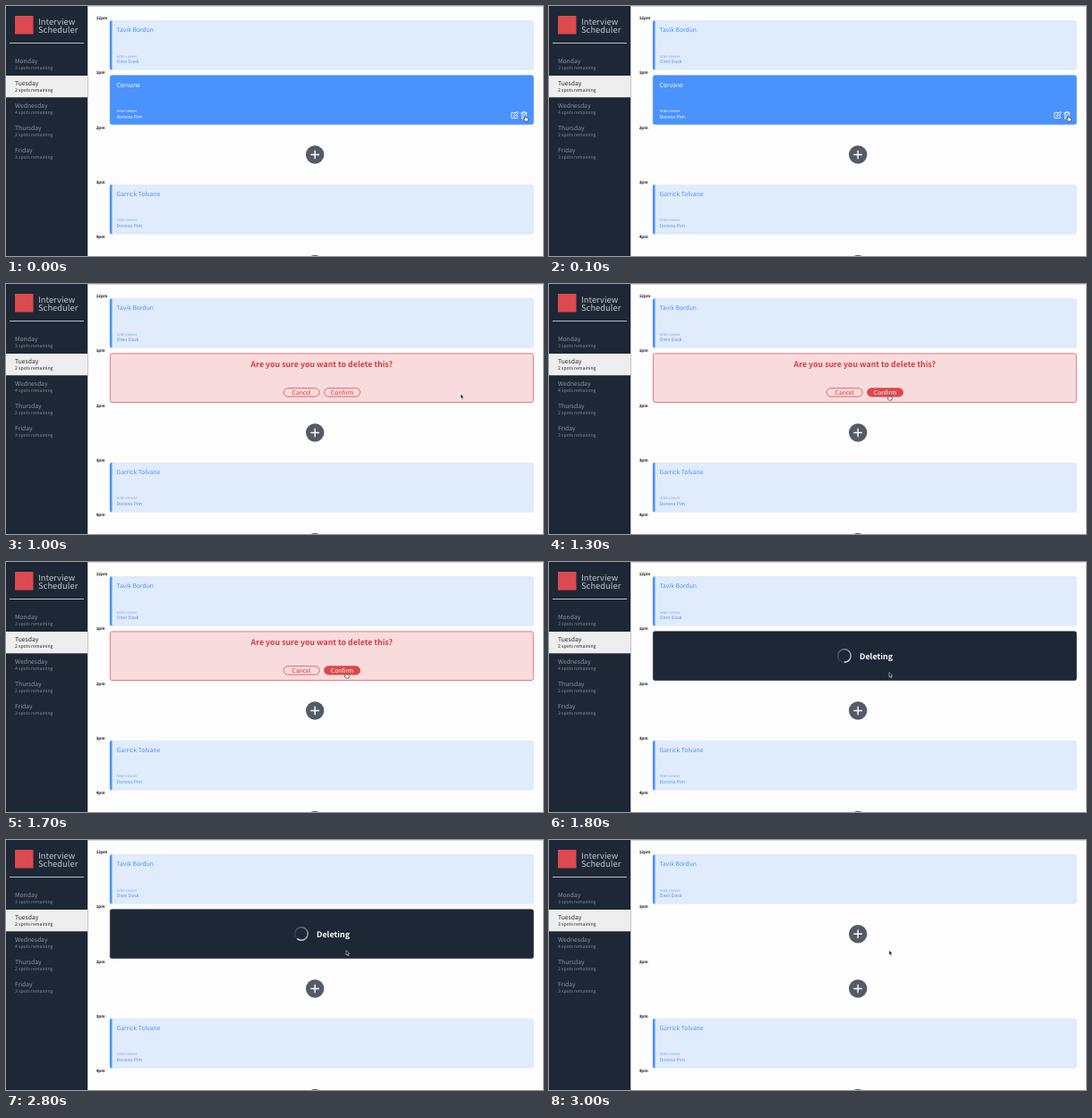
An HTML page that plays this animation: 600 px wide and 280 px high, repeating every 3100 ms.

```html
<!DOCTYPE html>
<html lang="en">
<head>
<meta charset="utf-8">
<title>Interview Scheduler</title>
<style>
  html, body { margin: 0; width: 100%; height: 100%; overflow: hidden; background: #fdfdfd; }
  svg { display: block; width: 600px; height: 280px; }
  text {
    font-family: "Noto Sans CJK JP", "Noto Sans CJK SC", "Noto Sans", sans-serif;
    font-size: 6.78px; font-weight: 500; text-rendering: geometricPrecision;
  }
  .logo { font-size: 9.3px; font-weight: 300; letter-spacing: .05px; fill: #c3c8ce; }
  .day { fill: #8d949d; }
  .spots { font-size: 5.15px; font-weight: 400; fill: #848b95; }
  .selected { fill: #23272d; }
  .time { font-size: 4.52px; font-weight: 700; fill: #161616; }
  .label { font-size: 4.34px; fill: #78acfb; }
  .name { font-size: 5.24px; }
  .blue { fill: #4a94fc; }
  .white { fill: #fff; }
  .big { font-size: 8.98px; font-weight: 700; }
  .ask { font-size: 8.8px; font-weight: 700; }
  .red { fill: #d9393e; }
  .mid { text-anchor: middle; }
  .icon { fill: none; stroke: #fff; stroke-width: .8; stroke-linejoin: round; stroke-linecap: round; }
</style>
</head>
<body>
<svg id="stage" viewBox="0 0 600 280"></svg>
<script>
const LOOP = 3100, STEP = 100, ROW = 61.3;
const DELETE_ASKED = 500, HOVER = 1200, DELETING = 1800, EMPTY = 2900;
const stage = document.getElementById('stage');

function add(parent, tag, attrs = {}, text) {
  const el = document.createElementNS('http://www.w3.org/2000/svg', tag);
  for (const key in attrs) el.setAttribute(key, attrs[key]);
  if (text) el.textContent = text;
  return parent.appendChild(el);
}
const group = (parent = stage) => add(parent, 'g');
const rect = (parent, x, y, width, height, fill, more) =>
  add(parent, 'rect', { x, y, width, height, fill, ...more });
const label = (parent, x, y, cls, text) => add(parent, 'text', { x, y, class: cls }, text);
const show = (el, on) => el.setAttribute('visibility', on ? 'visible' : 'hidden');

function panel(parent, row, fill, stroke, width = .6) {
  const inset = width / 2;
  return rect(parent, 116 + inset, 16.2 + row * ROW + inset, 473.6 - width, 55.4 - width, fill,
    { rx: 2, stroke, 'stroke-width': width });
}

function details(parent, row, title, interviewer, cls, labelCls) {
  const y = row * ROW;
  label(parent, 123.5, 29.4 + y, cls, title);
  label(parent, 123.5, 57.5 + y, labelCls, 'Interviewer');
  label(parent, 123.5, 64.2 + y, 'name ' + cls, interviewer);
}

function booking(row, title, interviewer) {
  const g = group(), top = 16.2 + row * ROW;
  panel(g, row, '#e0ebfc', '#d3e3fb');
  add(g, 'path', { d: `M118.5 ${top}h-.6a2 2 0 0 0-2 2v51.4a2 2 0 0 0 2 2h.6z`, fill: '#4a94fc' });
  details(g, row, title, interviewer, 'blue', 'label');
}

function plus(parent, row) {
  const y = 43.9 + row * ROW;
  add(parent, 'circle', { cx: 345.2, cy: y, r: 10.2, fill: '#545b66' });
  add(parent, 'path', { d: `M340.4 ${y}h9.6m-4.8-4.8v9.6`, stroke: '#fff', 'stroke-width': 1.4 });
}

function button(parent, x, text) {
  const box = rect(parent, x, 116.7, 40, 9.4, 'none',
    { rx: 4.7, stroke: '#dc474b', 'stroke-width': .8 });
  return [box, label(parent, x + 20, 123.9, 'mid red', text)];
}

// Sidebar
rect(stage, 0, 0, 600, 280, '#fdfdfd');
rect(stage, 91, 0, 509, .7, '#c9cacc');
rect(stage, 91, 0, 1, 280, '#c6c8cb');
rect(stage, 0, 0, 91, 280, '#1d2735');
rect(stage, 10, 11, 20.5, 20.5, '#dc4a4f');
label(stage, 36, 20.6, 'logo', 'Interview');
label(stage, 36, 30, 'logo', 'Scheduler');
rect(stage, 4, 41, 83, .8, '#e4e6e8');
rect(stage, 0, 78, 91, 24.3, '#eeeeee');

const spots = [3, 2, 4, 2, 3];
const spotLabels = ['Monday', 'Tuesday', 'Wednesday', 'Thursday', 'Friday'].map((day, i) => {
  const y = 63.7 + i * 25.1, picked = i === 1 ? ' selected' : '';
  label(stage, 10, y, 'day' + picked, day);
  return label(stage, 10, y + 7.2, 'spots' + picked, spots[i] + ' spots remaining');
});

// Schedule
['12pm', '1pm', '2pm', '3pm', '4pm'].forEach((hour, i) =>
  label(stage, 100.7, 15.1 + i * ROW, 'time', hour));
booking(0, 'Tavik Bordun', 'Oren Dask');
booking(3, 'Garrick Tolvane', 'Dorena Pim');
plus(stage, 2);
plus(stage, 4);

const booked = group();
panel(booked, 1, '#4a92fd', '#3f87f2');
details(booked, 1, 'Corvane', 'Dorena Pim', 'white', 'label white');
add(booked, 'path', { class: 'icon',
  d: 'M569.4 119.4h-4.6v6.2h6.4v-3.3M567.3 123.3l.3-1.6 3.9-3.4 1.2 1.3-3.8 3.4z' });
add(booked, 'path', { class: 'icon',
  d: 'M575.4 119.9h6.6M577.3 119.7v-1.3h2.8v1.3M576.1 120.2l.5 6.2h4.3l.5-6.2M578 121.7v3.2m1.5-3.2v3.2' });

const confirm = group();
panel(confirm, 1, '#f8dcdd', '#dc5a5e', .8);
label(confirm, 352.8, 93.2, 'mid ask red', 'Are you sure you want to delete this?');
button(confirm, 310.2, 'Cancel');
const [confirmBox, confirmText] = button(confirm, 355.6, 'Confirm');

const deleting = group();
panel(deleting, 1, '#1d2735', '#18212d');
label(deleting, 347, 108.5, 'big white', 'Deleting');
const spinner = group(deleting);
const SEGMENTS = 30;
for (let i = 0; i < SEGMENTS; i++) {
  const a = i / SEGMENTS * 2 * Math.PI, b = a + 2.2 * Math.PI / SEGMENTS;
  const at = angle => `${7.2 * Math.cos(angle)} ${7.2 * Math.sin(angle)}`;
  add(spinner, 'path', { d: `M${at(a)}A7.2 7.2 0 0 1 ${at(b)}`, fill: 'none', stroke: '#fff',
    'stroke-width': 1.4, opacity: .08 + .9 * (i / SEGMENTS) ** 1.4 });
}

const empty = group();
plus(empty, 1);

// Pointer, with its hot spot at 0,0
const pointer = group();
const arrow = add(pointer, 'path', { d: 'M0 0v5.2l1.2-1.1.9 2 1-.4-.9-2h1.6z',
  fill: '#111', stroke: '#fff', 'stroke-width': .5 });
const hand = add(pointer, 'path', {
  d: 'M-.7 .5q.7-.8 1.3 0v2l2.2.5q.7.2.6 1l-.5 2.5h-3.2l-1.8-2.3q.1-.9 1.4-.1z',
  fill: '#fff', stroke: '#222', 'stroke-width': .6, 'stroke-linejoin': 'round' });

// [time, x, y]
const path = [[0, 580.2, 122.6], [500, 579.3, 122.2], [700, 579.3, 122.2], [800, 573, 122.4],
  [900, 548, 122.8], [1000, 508, 123.2], [1100, 446, 123.6], [1200, 390, 123.6], [1300, 380, 123.6]];

function draw(time) {
  const t = Math.floor(time % LOOP / STEP) * STEP;
  const hover = t >= HOVER && t < DELETING;
  show(booked, t < DELETE_ASKED);
  show(confirm, t >= DELETE_ASKED && t < DELETING);
  show(deleting, t >= DELETING && t < EMPTY);
  show(empty, t >= EMPTY);
  spotLabels[1].textContent = (t >= EMPTY ? 3 : 2) + ' spots remaining';

  confirmBox.setAttribute('fill', hover ? '#dc474b' : 'none');
  confirmText.setAttribute('class', hover ? 'mid white' : 'mid red');
  spinner.setAttribute('transform', `translate(330 105) rotate(${90 + (t - DELETING) * .4})`);

  const [, x, y] = path.filter(p => p[0] <= t).pop();
  pointer.setAttribute('transform', `translate(${x} ${y})`);
  show(hand, t < DELETE_ASKED || hover);
  show(arrow, t >= DELETE_ASKED && !hover);
}

const start = performance.now();
function tick() {
  draw(performance.now() - start);
  requestAnimationFrame(tick);
}
tick();
</script>
</body>
</html>
```
